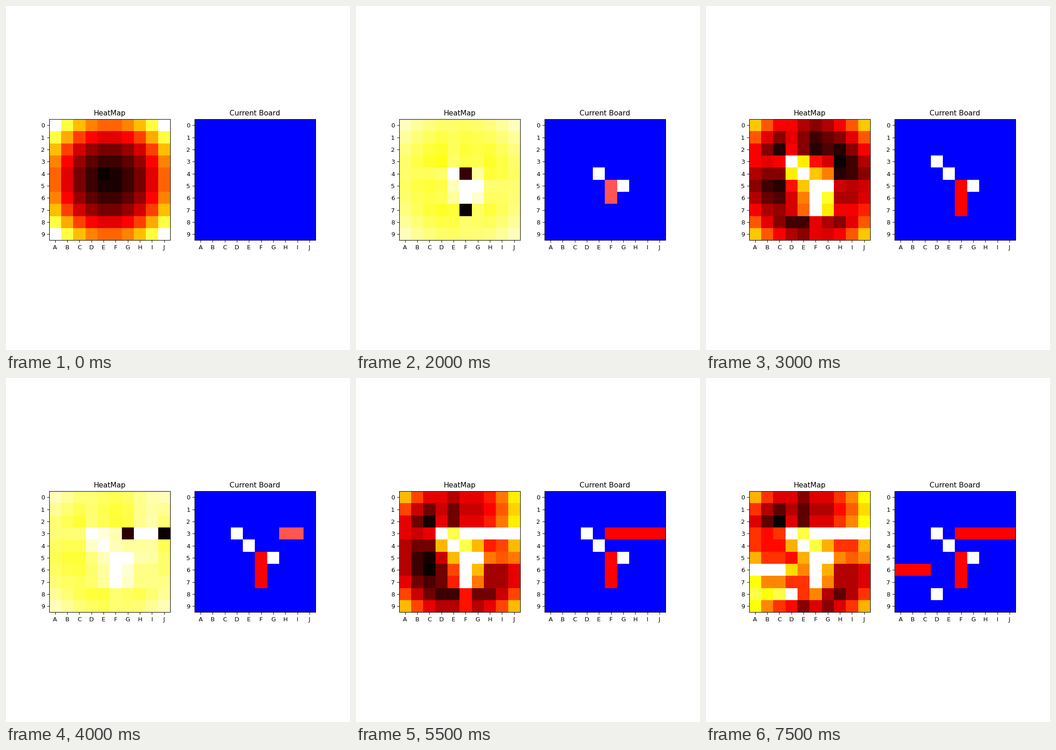
A matplotlib script that plays this animation: 748x748 px, repeating every 8000 ms.

```python
import numpy as np
import matplotlib.pyplot as plt
from matplotlib.animation import FuncAnimation
from matplotlib.colors import ListedColormap

SIZE = 10
COLS = "ABCDEFGHIJ"
FLEET = [5, 4, 3, 3, 2]
SHOTS = "E4 F5 G5 F6 F7 D3 H3 I3 J3 G3 F3 C6 B6 A6 D8 C2".split()
SHIPS = ["F5 F6 F7", "F3 G3 H3 I3 J3", "A6 B6 C6"]

WATER, MISS, HIT, SUNK = range(4)
BOARD_CMAP = ListedColormap(["#0000ff", "#ffffff", "#ff5555", "#ff0000"])


def cell(name):
    return int(name[1]), COLS.index(name[0])


shots = [cell(s) for s in SHOTS]
ships = [[cell(s) for s in ship.split()] for ship in SHIPS]


def play(n):
    """Board and ships still afloat after n shots."""
    board = np.full((SIZE, SIZE), WATER)
    afloat = list(FLEET)
    for shot in shots[:n]:
        ship = next((s for s in ships if shot in s), None)
        board[shot] = HIT if ship else MISS
        if ship and all(board[c] == HIT for c in ship):
            for c in ship:
                board[c] = SUNK
            afloat.remove(len(ship))
    return board, afloat


def coverage(free, length):
    """Chance that a randomly placed ship covers each cell."""
    cover = np.zeros((SIZE, SIZE))
    total = 0
    for open_cells, out in ((free, cover), (free.T, cover.T)):
        for r in range(SIZE):
            for c in range(SIZE - length + 1):
                if open_cells[r, c:c + length].all():
                    out[r, c:c + length] += 1
                    total += 1
    return cover / total


def targets(board):
    """Water cells next to the wounded ship, in line with it if known."""
    hits = [tuple(h) for h in np.argwhere(board == HIT)]
    steps = [(0, 1), (0, -1), (1, 0), (-1, 0)]
    if len(hits) > 1:
        steps = steps[:2] if hits[0][0] == hits[1][0] else steps[2:]
    near = {(r + dr, c + dc) for r, c in hits for dr, dc in steps}
    return [(r, c) for r, c in near
            if 0 <= r < SIZE and 0 <= c < SIZE and board[r, c] == WATER]


def heat_map(board, afloat, aim):
    free = board == WATER
    heat = sum(coverage(free, n) for n in afloat)
    wounded = targets(board)
    for c in wounded:
        heat[c] += 1
    # the next shot always goes to the hottest cell
    rest = heat.copy()
    rest[aim] = 0
    heat[aim] = max(heat[aim], rest.max() * (1 if wounded else 1.02))
    return heat


states = []
for n in range(len(shots)):
    board, afloat = play(n)
    states.append((heat_map(board, afloat, shots[n]), board))

fig, axes = plt.subplots(1, 2, figsize=(8, 8), dpi=93.5)


def add_grid(ax, title, data, **style):
    edges = np.arange(SIZE + 1) - 0.5
    mesh = ax.pcolormesh(edges, edges, data, **style)
    ax.set_aspect("equal")
    ax.set_xlim(edges[0], edges[-1])
    ax.set_ylim(edges[-1], edges[0])
    ax.set_title(title)
    ax.set_xticks(range(SIZE), list(COLS))
    ax.set_yticks(range(SIZE))
    return mesh


heat_mesh = add_grid(axes[0], "HeatMap", states[0][0], cmap="hot_r")
board_mesh = add_grid(axes[1], "Current Board", states[0][1],
                      cmap=BOARD_CMAP, vmin=WATER, vmax=SUNK)


def update(i):
    heat, board = states[i]
    heat_mesh.set_array(heat)
    heat_mesh.set_clim(heat.min(), heat.max())
    board_mesh.set_array(board)
    return heat_mesh, board_mesh


anim = FuncAnimation(fig, update, frames=len(states), interval=500,
                     init_func=lambda: update(0), repeat=True, repeat_delay=0)
plt.show()
```
